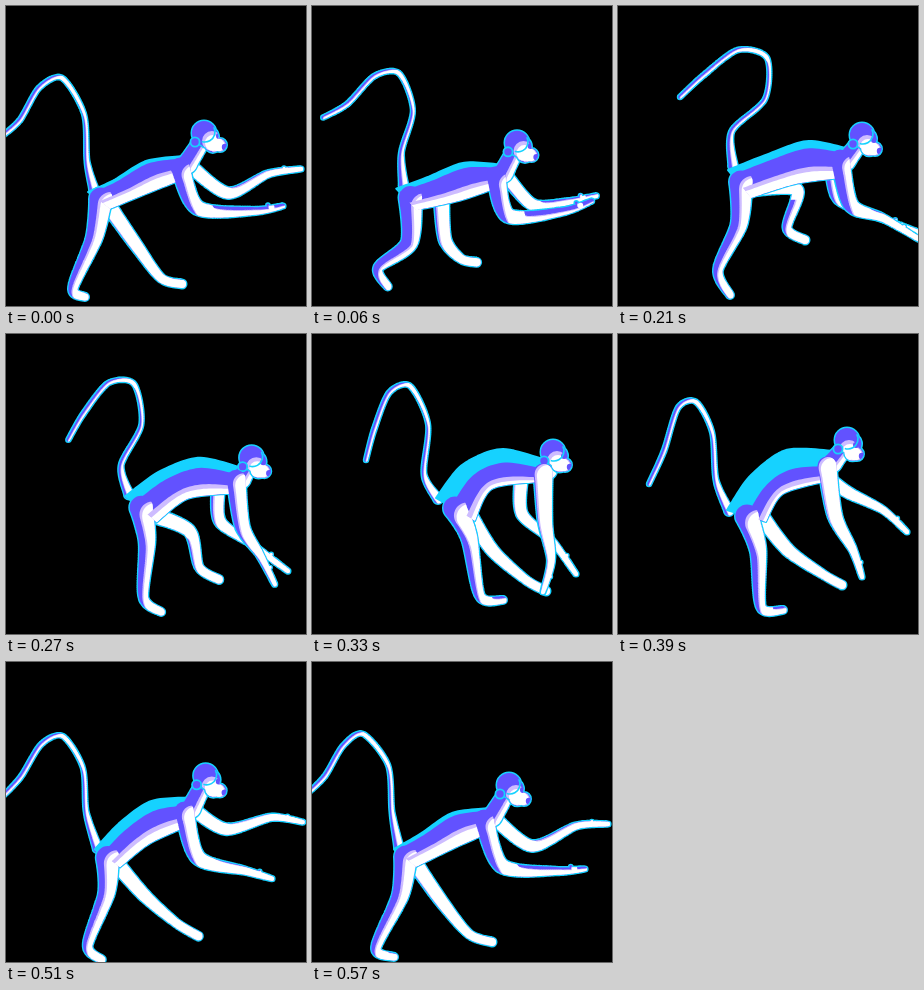
An HTML page with a canvas that plays this animation: 300 px wide and 300 px high, repeating every 0.6 s.

```html
<!DOCTYPE html>
<html lang="en">
<head>
<meta charset="utf-8">
<title>Running monkey</title>
<style>
html, body { margin: 0; width: 100%; height: 100%; overflow: hidden; background: #000; }
canvas { display: block; width: 300px; height: 300px; }
</style>
</head>
<body>
<canvas id="stage" width="300" height="300"></canvas>
<script>
const ctx = document.getElementById('stage').getContext('2d');
const LOOP = 600, STEP = 30;
const CYAN = '#16d2ff', VIOLET = '#6252ff', LILAC = '#cdbcff', WHITE = '#fff';
const LIGHT = [0.85, 0.53];

// One row per key pose; each row holds x, y pairs from the body outwards.
const TIMES = [0, 120, 210, 330, 390, 450, 570];
const TAIL = [
  [88,184, 81,155, 78,108, 56,72, 33,82, 14,114, -5,131],
  [97,174, 99,136, 124,99, 118,62, 92,58, 58,82, 30,94],
  [115,160, 114,125, 147,93, 149,52, 120,44, 86,69, 62,91],
  [126,165, 112,140, 116,90, 98,52, 77,59, 62,96, 54,126],
  [111,177, 98,146, 94,98, 78,68, 60,74, 46,117, 31,150],
  [98,185, 83,150, 80,107, 65,75, 42,80, 20,117, -5,146],
  [87,186, 80,150, 76,103, 51,72, 31,84, 13,114, -5,132]
];
const BACK = [
  [82,186, 108,174, 140,155, 178,150],
  [89,178, 125,166, 165,155, 205,163],
  [110,164, 150,148, 190,135, 232,143],
  [124,164, 150,131, 190,115, 240,128],
  [109,176, 132,142, 168,116, 217,117],
  [97,186, 120,150, 152,127, 194,125],
  [82,187, 108,172, 140,151, 178,146]
];
const BELLY = [
  [104,203, 145,186, 186,170],
  [108,204, 155,199, 202,185],
  [133,192, 178,178, 222,172],
  [163,187, 180,155, 228,148],
  [148,188, 165,160, 210,147],
  [127,203, 146,176, 192,156],
  [104,205, 145,185, 184,168]
];
const HEAD = [
  [198,127, 214,139], [215,143, 228,156], [244,129, 257,143], [241,118, 253,131],
  [229,106, 239,120], [206,106, 219,121], [197,123, 212,137]
];
const NEAR_ARM = [
  [174,161, 192,202, 248,205, 277,200],
  [196,174, 204,215, 255,207, 284,197],
  [222,153, 233,199, 265,212, 304,235],
  [231,139, 233,187, 239,226, 231,258],
  [209,132, 217,182, 235,216, 244,243],
  [188,141, 198,187, 235,209, 258,227],
  [172,157, 190,204, 245,209, 273,207]
];
const FAR_ARM = [
  [184,160, 222,187, 262,168, 295,163],
  [206,180, 220,207, 248,219, 278,215],
  [214,168, 221,193, 252,208, 300,226],
  [209,145, 210,180, 240,207, 264,240],
  [212,146, 231,159, 265,176, 289,198],
  [194,140, 222,153, 266,152, 296,164],
  [182,156, 220,184, 264,164, 296,162]
];
const NEAR_LEG = [
  [95,193, 88,232, 67,282, 79,291],
  [104,189, 107,239, 69,247, 78,274],
  [123,176, 121,218, 100,264, 112,289],
  [143,174, 157,203, 168,262, 191,266],
  [129,182, 140,216, 143,273, 165,276],
  [112,194, 116,226, 105,279, 116,296],
  [94,195, 88,234, 64,286, 82,295]
];
const FAR_LEG = [
  [102,199, 130,239, 155,272, 176,278],
  [152,190, 141,224, 147,234, 159,237],
  [138,182, 179,184, 169,222, 187,234],
  [158,182, 181,217, 214,246, 234,257],
  [145,185, 171,217, 206,241, 224,251],
  [122,200, 150,226, 185,249, 206,266],
  [102,200, 130,240, 157,272, 180,280]
];
// Cyan depth and white start on the torso, then white share of each limb.
const SHADE = [
  [.10, .60, .25, .72, .48, .68],
  [.20, .80, .12, .35, .18, .72],
  [.18, .70, .22, .50, .42, .50],
  [.38, .84, .78, .85, .38, .85],
  [.50, .86, .78, .85, .42, .85],
  [.44, .84, .68, .85, .52, .82],
  [.10, .60, .25, .72, .48, .68]
];

const mix = (a, b, k) => a + (b - a) * k;

function hermite(a, b, da, db, u) {
  const u2 = u * u, u3 = u2 * u;
  return a * (2 * u3 - 3 * u2 + 1) + b * (3 * u2 - 2 * u3)
    + da * (u3 - 2 * u2 + u) + db * (u3 - u2);
}

// Smooth cyclic interpolation between key poses.
function pose(table, t) {
  const n = TIMES.length;
  const at = i => TIMES[(i + n) % n] + Math.floor(i / n) * LOOP;
  const row = i => table[(i + n) % n];
  let i = n - 1;
  while (TIMES[i] > t) i--;
  const span = at(i + 1) - at(i);
  const slope = (j, c) => (row(j + 1)[c] - row(j - 1)[c]) / (at(j + 1) - at(j - 1)) * span;
  return row(i).map((v, c) =>
    hermite(v, row(i + 1)[c], slope(i, c), slope(i + 1, c), (t - at(i)) / span));
}

// Samples a spline through x, y pairs; result items are [x, y, position].
function curve(flat, count, pull = 0.42) {
  const n = flat.length / 2, out = [];
  const p = (i, c) => flat[Math.max(0, Math.min(n - 1, i)) * 2 + c];
  for (let k = 0; k <= count; k++) {
    const s = k / count * (n - 1), i = Math.min(n - 2, Math.floor(s));
    const axis = c => hermite(p(i, c), p(i + 1, c),
      (p(i + 1, c) - p(i - 1, c)) * pull, (p(i + 2, c) - p(i, c)) * pull, s - i);
    out.push([axis(0), axis(1), s]);
  }
  return out;
}

function limb(flat, radii) {
  return curve(flat, (radii.length - 1) * 26).map(([x, y, s]) => {
    const i = Math.min(radii.length - 2, Math.floor(s));
    return [x, y, mix(radii[i], radii[i + 1], s - i)];
  });
}

function arm(flat, radii) {
  const [wx, wy, tx, ty] = flat.slice(4);
  const len = Math.hypot(tx - wx, ty - wy) || 1;
  const thumb = [mix(wx, tx, .5) + (ty - wy) / len * 3.5,
                 mix(wy, ty, .5) - (tx - wx) / len * 3.5, 2.8];
  return [...limb(flat, radii), thumb];
}

function blob(dots, grow = 0, dx = 0, dy = 0) {
  const path = new Path2D();
  for (const [x, y, r] of dots) {
    const size = Math.max(.3, r + grow);
    path.moveTo(x + dx + size, y + dy);
    path.arc(x + dx, y + dy, size, 0, 7);
  }
  return path;
}

function fill(path, color) {
  ctx.fillStyle = color;
  ctx.fill(path);
}

function within(path, draw) {
  ctx.save();
  ctx.clip(path);
  draw();
  ctx.restore();
}

const rim = dots => fill(blob(dots), CYAN);

function flesh(dots, share) {
  const core = blob(dots, -1.4);
  const lit = k => blob(dots.map(([x, y, r]) =>
    [x + LIGHT[0] * r * 2 * k, y + LIGHT[1] * r * 2 * k, r]));
  fill(core, VIOLET);
  within(core, () => {
    fill(lit(1 - share - .08), LILAC);
    fill(lit(1 - share + .04), WHITE);
  });
}

function band(back, belly, from) {
  const path = new Path2D();
  back.forEach(([x, y], i) =>
    path.lineTo(mix(x, belly[i][0], from), mix(y, belly[i][1], from)));
  [...belly].reverse().forEach(([x, y]) => path.lineTo(x, y));
  path.closePath();
  return path;
}

function drawHead([x, y, mx, my]) {
  const skull = [[x, y, 13.5], [x + 4, y + 4, 12]];
  const jaw = [[mx, my, 8], [mix(x, mx, .55), mix(y, my, .7) + 3, 9.5]];
  rim([...skull, ...jaw]);
  fill(blob([...skull, ...jaw], -1.5), VIOLET);
  within(blob([...skull, ...jaw], -1.5), () => {
    fill(blob([[mx - 8, my - 4, 10], [mx - 2, my + 1, 8]]), LILAC);
    fill(blob([[mx - 7, my - 2, 8], [mx - 2, my, 6.5]]), WHITE);
    fill(blob([[mx + 5, my + 2, 3.2], [mx - 1, my - 9, 3]]), VIOLET);
    ctx.strokeStyle = CYAN;
    ctx.lineWidth = 1.6;
    ctx.beginPath();
    ctx.arc(x + 1, y - 1, 10, -.5, 1.9);
    ctx.stroke();
  });
  const ear = [[x - 9, y + 9, 5.5]];
  rim(ear);
  fill(blob(ear, -1.8), VIOLET);
}

function draw(t) {
  const [cyan, white, armLit, farArmLit, legLit, farLegLit] = pose(SHADE, t);
  const back = curve(pose(BACK, t), 40), belly = curve(pose(BELLY, t), 40);
  const head = pose(HEAD, t);
  const tail = limb(pose(TAIL, t), [6, 3.6, 3.2, 3.3, 3.4, 3.5, 3.2]);
  const farLeg = limb(pose(FAR_LEG, t), [9, 7.5, 5.5, 5.5]);
  const farArm = arm(pose(FAR_ARM, t), [8, 7, 4.8, 3.6]);
  const leg = limb(pose(NEAR_LEG, t), [13, 9.5, 6, 5]);
  const fore = arm(pose(NEAR_ARM, t), [11, 8.5, 5.2, 3.6]);
  const [bx, by] = back[40], [cx, cy] = belly[40];
  const neck = limb([mix(bx, cx, .4), mix(by, cy, .4), head[0] - 1, head[1] + 6], [11, 9]);

  ctx.fillStyle = '#000';
  ctx.fillRect(0, 0, 300, 300);

  for (const [dots, lit] of [[tail, .42], [farLeg, farLegLit], [farArm, farArmLit]]) {
    rim(dots);
    flesh(dots, lit);
  }

  const torso = band(back, belly, 0);
  fill(torso, CYAN);
  ctx.strokeStyle = CYAN;
  ctx.lineWidth = 2;
  ctx.lineJoin = 'round';
  ctx.stroke(torso);
  [neck, leg, fore].forEach(rim);
  flesh(neck, .3);
  fill(band(back, belly, cyan), VIOLET);
  flesh(leg, legLit);
  within(torso, () => {
    fill(band(back, belly, white - .06), LILAC);
    fill(band(back, belly, white + .06), WHITE);
  });
  drawHead(head);
  flesh(fore, armLit);
}

function tick() {
  draw(Math.floor(performance.now() % LOOP / STEP) * STEP);
  requestAnimationFrame(tick);
}
tick();
</script>
</body>
</html>
```
